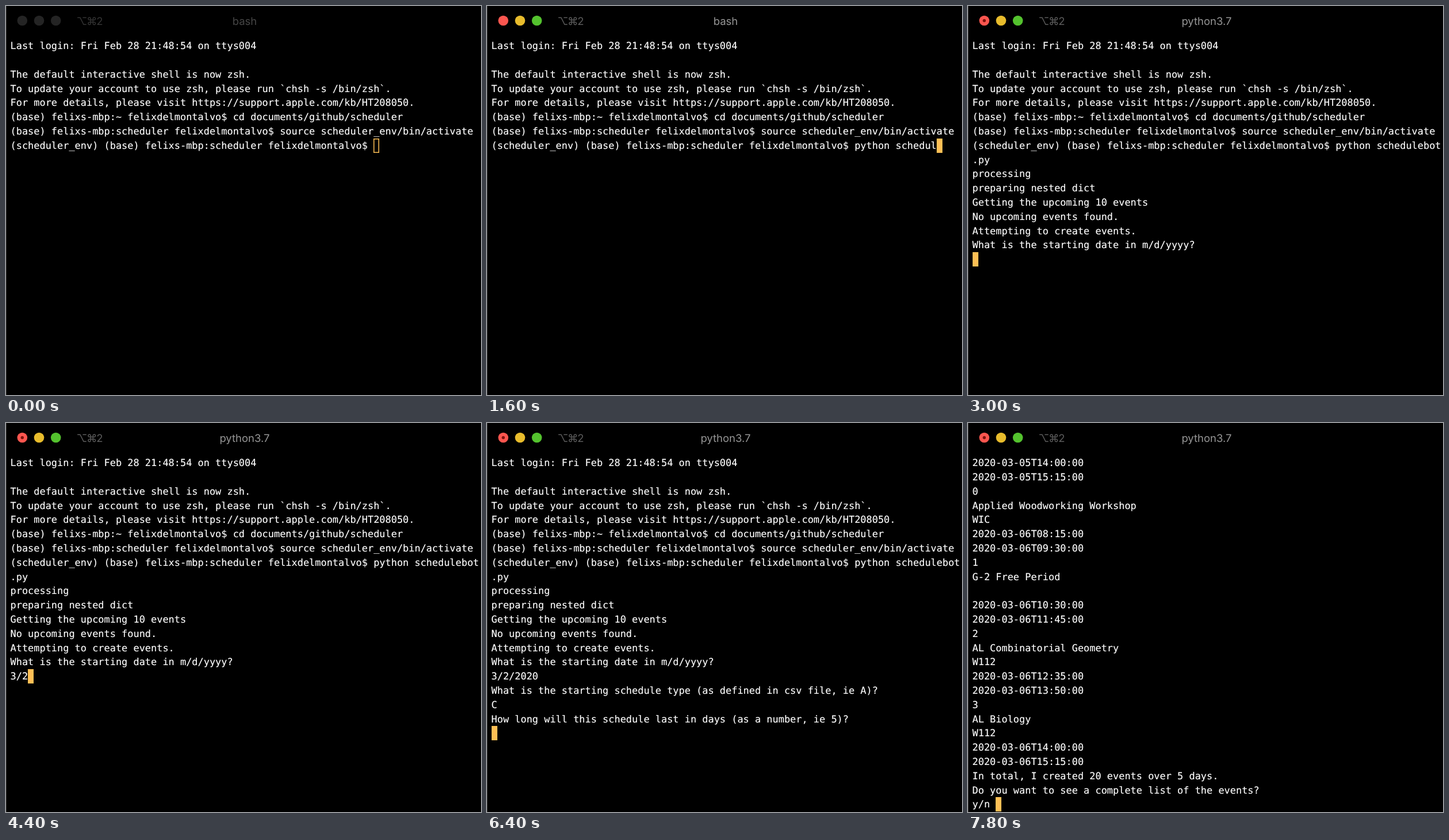
These frames come from a looping animation (826x678 px, 8 s). An HTML page:

```html
<!DOCTYPE html>
<html lang="en">
<head>
<meta charset="utf-8">
<title>Terminal</title>
<style>
  html, body { margin: 0; width: 100%; height: 100%; overflow: hidden; background: #000; }
  #win { position: relative; width: 826px; height: 678px; overflow: hidden; background: #000; text-rendering: geometricPrecision; }
  #win::before { content: ""; position: absolute; left: 0; top: 0; width: 1px; height: 100%; background: #333; }
  svg { position: absolute; left: 0; top: 0; font: 18.5px Inter, "DejaVu Sans", sans-serif; }
  #red { fill: #fc564f; }
  #yellow { fill: #e8bc2c; }
  #green { fill: #54c22e; }
  #mark { fill: #7c120e; visibility: hidden; }
  #keys { fill: #5c5c5c; }
  #title { fill: #969696; text-anchor: middle; }
  .idle #red, .idle #yellow, .idle #green { fill: #242424; }
  .idle #keys { fill: #343434; }
  .idle #title { fill: #464646; }
  .busy #mark { visibility: visible; }
  #screen {
    position: absolute; left: 7.5px; top: 57.3px; margin: 0; white-space: pre; color: #fff;
    font: 16.93px/24.79px "DejaVu Sans Mono", "Liberation Mono", monospace;
    -webkit-text-stroke: 0.15px #fff;
  }
  #cursor { display: inline-block; width: 10.2px; height: 24.79px; vertical-align: top; background: #ffbf55; }
  .idle #cursor { background: none; box-shadow: inset 0 0 0 1.5px #ffbf55; }
</style>
</head>
<body>
<div id="win" class="idle">
  <svg width="826" height="56">
    <circle id="red" cx="28.3" cy="25.5" r="8.8"/>
    <circle id="mark" cx="28.3" cy="25.5" r="2.7"/>
    <circle id="yellow" cx="57.5" cy="25.5" r="8.8"/>
    <circle id="green" cx="86.7" cy="25.5" r="8.8"/>
    <text id="keys" x="122.5 140 157.3" y="32.6">⌥⌘2</text>
    <text id="title" x="415" y="32.6">bash</text>
  </svg>
  <pre id="screen"><span id="text"></span><span id="cursor"></span></pre>
</div>
<script>
const LOOP = 8000, COLS = 80;
const $ = id => document.getElementById(id);

const host = "felixs-mbp", user = "felixdelmontalvo";
const prompt = dir => `(base) ${host}:${dir} ${user}$ `;

const shell = `Last login: Fri Feb 28 21:48:54 on ttys004

The default interactive shell is now zsh.
To update your account to use zsh, please run \`chsh -s /bin/zsh\`.
For more details, please visit https://support.apple.com/kb/HT208050.
${prompt("~")}cd documents/github/scheduler
${prompt("scheduler")}source scheduler_env/bin/activate
(scheduler_env) ${prompt("scheduler")}`;

const command = "python schedulebot.py";
const started = shell + command + "\n";
const working = started + "processing\npreparing nested dict\n";
const askDate = working + `Getting the upcoming 10 events
No upcoming events found.
Attempting to create events.
What is the starting date in m/d/yyyy?
`;
const date = "3/2/2020";
const askType = askDate + date + "\nWhat is the starting schedule type (as defined in csv file, ie A)?\n";
const askDays = askType + "C\nHow long will this schedule last in days (as a number, ie 5)?\n";

const slot = (day, from, to) => `2020-03-${day}T${from}:00\n2020-03-${day}T${to}:00\n`;
const summary = slot("05", "14:00", "15:15")
  + "0\nApplied Woodworking Workshop\nWIC\n" + slot("06", "08:15", "09:30")
  + "1\nG-2 Free Period\n\n" + slot("06", "10:30", "11:45")
  + "2\nAL Combinatorial Geometry\nW112\n" + slot("06", "12:35", "13:50")
  + "3\nAL Biology\nW112\n" + slot("06", "14:00", "15:15")
  + "In total, I created 20 events over 5 days.\nDo you want to see a complete list of the events?\ny/n ";

// Typed text grows to the given lengths, one every 200 ms.
const type = (start, before, word, lengths) =>
  lengths.map((n, i) => [start + i * 200, before + word.slice(0, n)]);

const steps = [
  [0, shell],
  ...type(400, shell, command, [0, 1, 3, 5, 8, 12, 14, 16, 18, 19, 21]),
  [2600, started],
  [2800, working],
  [3000, askDate],
  ...type(4000, askDate, date, [1, 2, 3, 4, 6, 8]),
  [5200, askType],
  [6000, askType + "C"],
  [6400, askDays],
  [7600, askDays + "5"],
  [7800, summary]
];

const wrap = s => s.replace(new RegExp(`.{${COLS}}`, "g"), "$&\n");
let shown = -1;

function draw() {
  const t = performance.now() % LOOP;
  let i = steps.length - 1;
  while (steps[i][0] > t) i--;
  if (i !== shown) {
    shown = i;
    const busy = t >= 2800;
    $("text").textContent = wrap(steps[i][1]);
    $("title").textContent = busy ? "python3.7" : "bash";
    $("win").className = t < 400 ? "idle" : busy ? "busy" : "";
  }
  requestAnimationFrame(draw);
}
draw();
</script>
</body>
</html>
```
